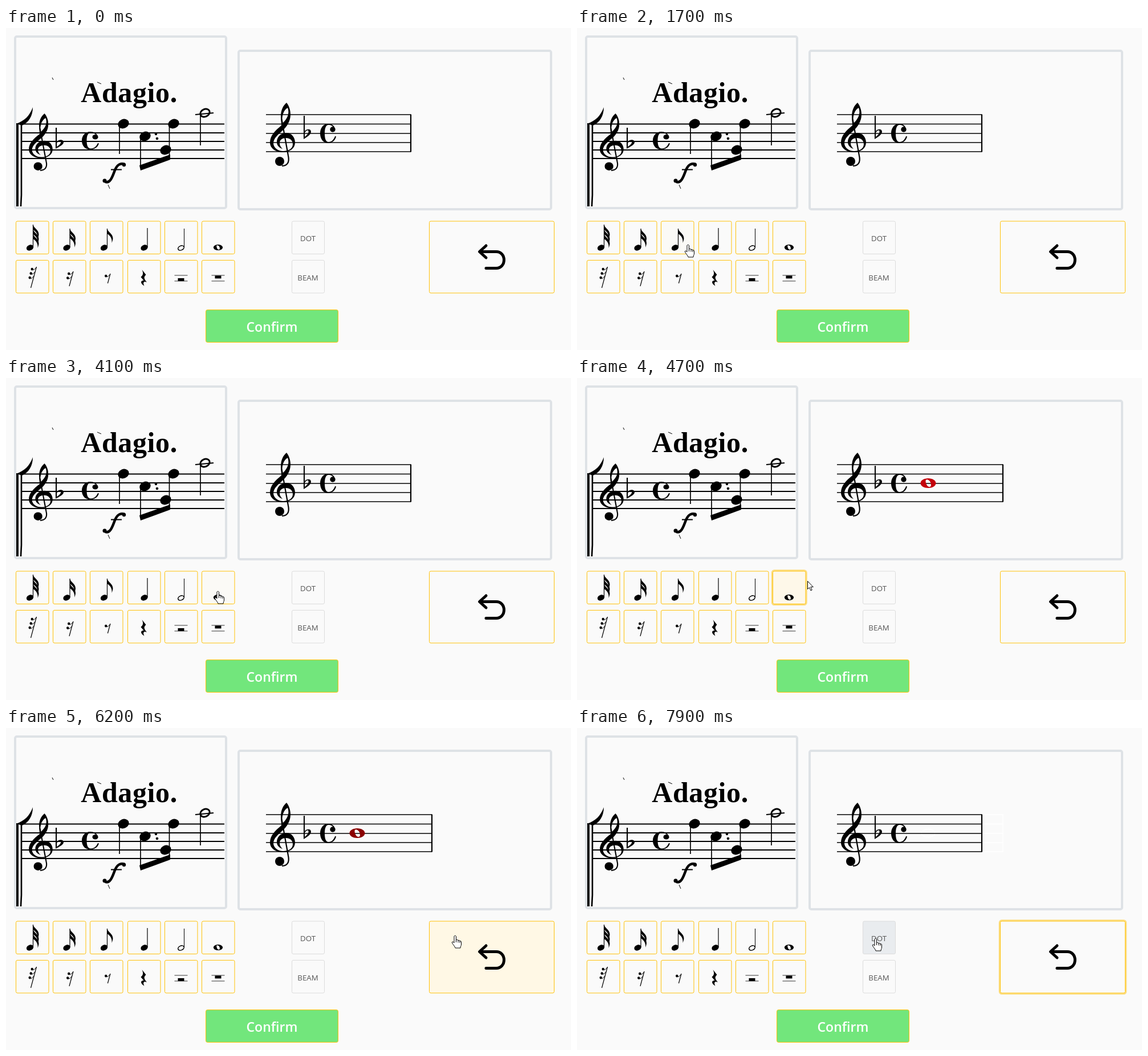
These frames come from a looping animation (991x565 px, 8 s). An HTML page:

```html
<!DOCTYPE html>
<html>
<head>
<meta charset="utf-8">
<style>
html, body { margin: 0; width: 100%; height: 100%; overflow: hidden; background: #fafafa; }
svg { display: block; }
text { font-family: "Open Sans", "Noto Sans", sans-serif; text-anchor: middle; }
.line { fill: none; stroke: #000; }
.panel { fill: none; stroke: #dee2e6; stroke-width: 4; }
</style>
</head>
<body>
<svg id="stage" width="991" height="565" viewBox="0 0 991 565">
<defs>
  <g id="clef">
    <path fill-rule="evenodd" d="M483 171C472 180 463 189 463 201C463 211 473 218 485 218C498 218 507 211 507 201C507 192 501 184 492 184C481 184 475 192 475 200C475 206 479 210 485 212C481 208 480 205 480 202C480 196 485 193 491 193C499 193 503 198 503 204C503 212 495 216 486 216C477 216 469 210 469 202C469 194 477 187 485 180C493 173 499 163 499 152C499 145 497 137 492 131C485 137 482 146 482 155C482 161 483 166 483 171ZM485 167C483 154 487 144 494 140C498 150 493 160 485 167Z"/>
    <path class="line" stroke-width="2.2" d="M483.500 160L495 224C498 237 492 242 484 242"/>
    <circle cx="480" cy="234" r="8"/>
  </g>
  <path id="flat" fill-rule="evenodd" d="M522 154H524V181C528 176 535 177 535 182C535 187 528 191 522 195ZM524 184V191C529 187 531 184 530.500 181C530 178 526 180 524 184Z"/>
  <g id="common">
    <path d="M577 177C576 171 571 168 565 168C556 168 551 176 551 185C551 194 556 202 565 202C573 202 578 196 579 190L577 190C575 196 571 200 566 200C560 200 559 192 559 185C559 178 560 170 566 170C570 170 573 172 575 175Z"/>
    <circle cx="573" cy="178" r="4.700"/>
  </g>
  <path id="whole" fill-rule="evenodd" d="M-13.500 0C-13.500-5-7-8.500 0-8.500S13.500-5 13.500 0S7 8.500 0 8.500S-13.500 5-13.500 0ZM-4.500-3C-4 2-1 7 2.500 6.500C6 6 5 2 4 -1.500C2.500-6-5-9-4.500-3Z"/>
</defs>

<rect class="panel" x="16" y="15" width="370" height="301" rx="3"/>
<rect class="panel" x="408" y="40" width="548" height="278" rx="3"/>

<g id="scan">
  <text x="216" y="130" font-size="50" font-weight="700" letter-spacing=".6" style="font-family:'Liberation Serif',serif">Adagio.</text>
  <path class="line" stroke-width="1.900" d="M24 168.500H383M28 184H383M28 199H383M28 214H383M28 229H383"/>
  <path class="line" stroke-width="4" d="M20 167V313"/>
  <path class="line" stroke-width="2.600" d="M27 168V293L26 313"/>
  <path d="M18 168C32 163 41 155 47 139C47 154 40 166 28 171Z"/>
  <use href="#clef" transform="translate(40 150) scale(.95 .9) translate(-463 -131)"/>
  <use href="#flat" transform="translate(87 175) scale(1.080 .9) translate(-522 -154)"/>
  <use href="#common" transform="translate(133 182) scale(1.070 .92) translate(-551 -168)"/>
  <path class="line" stroke-width="1.700" d="M199 168V221M236 190V246M286.500 168V230M341 150V206"/>
  <path d="M234 241L288 222V231L236 250Z"/>
  <circle cx="263" cy="186" r="2.300"/><circle cx="265" cy="194" r="2.300"/>
  <ellipse class="line" stroke-width="3" cx="349" cy="149" rx="8.500" ry="6.500" transform="rotate(-25 349 149)"/>
  <path class="line" stroke-width="2" d="M332 152L364 149"/>
  <path class="line" stroke-width="4.500" d="M174 270C182 273 186 263 190 252C194 241 199 236 208 239"/>
  <path class="line" stroke-width="2" d="M184 248.500H203"/>
  <circle cx="173" cy="268" r="3.500"/><circle cx="207" cy="240" r="3.200"/>
  <path class="line" d="M81 87L83 91M160 95L167 98M179 275L182 282"/>
</g>

<g id="ghost" class="line" style="stroke:#fff" stroke-width="1.500">
  <path d="M712 152H748M712 168.500H748M712 185H748M712 201H748M712 217H748M747 152V217"/>
  <ellipse cx="616" cy="184.500" rx="12" ry="7"/>
</g>
<path id="staff" class="line" stroke-width="1.500"/>
<path id="bar" class="line" stroke-width="2.200"/>
<use href="#clef"/><use href="#flat"/><use href="#common"/>
<use id="note" href="#whole" x="616" y="184.500"/>

<g id="buttons"></g>
<g id="icons"></g>
<path class="line" stroke-width="5" stroke-linecap="round" stroke-linejoin="round" d="M842 421.500H860C868 421.500 873.500 415 873.500 407S868 392.500 860 392.500H831M842 382L830.500 392.500L842 403"/>
<g fill="#555" font-size="13.300">
  <text x="529.500" y="374">DOT</text><text x="529.500" y="443">BEAM</text>
</g>
<rect x="350.500" y="494.500" width="232" height="57" rx="3" fill="#72e67c" stroke="#ffc107"/>
<text x="466.500" y="533" font-size="23" font-weight="600" fill="#fff">Confirm</text>

<g id="cursor" fill="#fff" stroke="#000" stroke-linejoin="round">
  <path id="arrow" d="M.5 .5V14.500L3.600 11.600L6 17L8.200 16L5.900 10.700H10.300Z"/>
  <path id="hand" d="M-2 2C-2-.2 1.500-.2 1.500 2V8C3 7 5 7.500 5 9C6.500 8 8 8.700 8 10C9.500 9.300 10.500 10 10.500 12V16C10.500 18 9 19 9 22H0C0 20-4 16-5.500 13C-6.500 11-4 10-2 13ZM1.500 8V12M5 9V12.500M8 10V13"/>
</g>
</svg>

<script>
const $ = id => document.getElementById(id);
const head = (x, y, rx = 6.4, ry = 4.8) =>
  `<ellipse cx="${x}" cy="${y}" rx="${rx}" ry="${ry}" transform="rotate(-25 ${x} ${y})"/>`;
const stroke = (d, w = 1.2) => `<path class="line" stroke-width="${w}" d="${d}"/>`;
const dot = (x, y) => `<circle cx="${x}" cy="${y}" r="2.200"/>`;

for (const [x, y] of [[206, 168], [244, 190], [280, 214], [294, 168]])
  $('scan').innerHTML += head(x, y, 10, 8);

// Stemmed notes: flags hang from the stem top, 8 px apart.
function note(x, top, flags) {
  let s = head(x - 5.5, 385.5) + stroke(`M${x} 385V${top}`);
  for (let i = 0; i < flags; i++)
    s += `<path d="M${x} ${top + i * 8}c1 6 10 9 10 17c0 3-1 5-2 8c1-8-3-13-8-16z"/>`;
  return s;
}

function rest(x, top, bottom, n) {
  const slope = 10 / 37, len = bottom - top;
  let s = stroke(`M${x} ${top}L${x - len * slope} ${bottom}`);
  for (let i = 0; i < n; i++) {
    const y = top + 1 + i * 7.5, sx = x - (y - top) * slope;
    s += dot(sx - 7.5, y + 3) + stroke(`M${sx - 8} ${y + 5}Q${sx - 3} ${y + 5} ${sx} ${y}`, 1);
  }
  return s;
}

const block = (x, y) =>
  stroke(`M${x - 11.5} 434H${x + 11.5}M${x - 11.5} 444H${x + 11.5}`, .8) +
  `<rect x="${x - 5.5}" y="${y}" width="11" height="5"/>`;

$('icons').innerHTML =
  note(47.5, 345, 3) + note(112, 352, 2) + note(177.5, 352, 1) + note(248, 351, 0) +
  `<ellipse class="line" stroke-width="1.600" cx="307" cy="386" rx="5.500" ry="3.700" transform="rotate(-25 307 386)"/>` +
  stroke('M312.500 384V352', 1) +
  '<use href="#whole" transform="translate(372 385) scale(.6)"/>' +
  rest(53.5, 419, 456, 3) + rest(118, 427, 453, 2) + rest(183, 431, 448, 1) +
  '<path d="M238.500 424L245.500 433C241 437 242 440 247 446C242 444 239.500 446 242.500 452.500C236 449 235 443 241.500 443L236.500 437C241 433 241 430 238.500 424Z"/>' +
  block(307, 439) + block(372, 434.5);

const buttons = [];
function addButton(x, y, w, h, border, tint) {
  const rect = attrs => {
    const r = document.createElementNS('http://www.w3.org/2000/svg', 'rect');
    for (const [k, v] of Object.entries({ fill: 'none', rx: 2.5, ...attrs })) r.setAttribute(k, v);
    return $('buttons').appendChild(r);
  };
  const ring = rect({ x: x - 1.5, y: y - 1.5, width: w + 3, height: h + 3, rx: 4,
    stroke: '#ffc107', 'stroke-opacity': .5, 'stroke-width': 2.5 });
  const fill = rect({ x, y, width: w, height: h, fill: tint });
  rect({ x, y, width: w, height: h, stroke: border });
  buttons.push({ x, y, w, h, ring, fill });
}
for (let row = 0; row < 2; row++)
  for (let col = 0; col < 6; col++)
    addButton(Math.round(17 + col * 65.2) + .5, row ? 407.5 : 339, 57.5, 57.5, '#ffc107', '#fff8e5');
addButton(501.5, 339, 57, 57.5, '#dcdcdc', '#e9ecef');
addButton(501.5, 407.5, 57, 57.5, '#dcdcdc', '#e9ecef');
addButton(742.5, 339, 219, 126, '#ffc107', '#fff8e5');
const WHOLE = 5, UNDO = 14;

// Pointer tip: time, x, y
const path = [
  [300, 915, 110], [400, 836, 161], [500, 836, 161], [700, 740, 195], [900, 430, 290],
  [1100, 150, 350], [1300, 56, 362], [1400, 101, 363], [1600, 141, 372], [1700, 195, 380],
  [2000, 360, 392], [2100, 377, 405], [2300, 245, 430], [2500, 105, 447], [2600, 52, 450],
  [2700, 24, 441], [2900, 80, 437], [3200, 217, 442], [3500, 340, 440], [3600, 386, 432],
  [3800, 384, 418], [4000, 374, 400], [4100, 372, 374], [4600, 372, 374], [5000, 500, 300],
  [5200, 528, 284], [5500, 513, 281], [5700, 560, 300], [6000, 730, 350], [6100, 788, 364],
  [6400, 788, 364], [6700, 560, 385], [7000, 222, 388], [7200, 110, 378], [7300, 112, 376],
  [7500, 230, 380], [7800, 514, 372], [7900, 524, 369]
];

function pointer(t) {
  if (t < path[0][0]) return null;
  const i = path.findIndex(p => p[0] > t);
  if (i < 0) return path.at(-1).slice(1);
  const [t0, x0, y0] = path[i - 1], [t1, x1, y1] = path[i], k = (t - t0) / (t1 - t0);
  return [x0 + (x1 - x0) * k, y0 + (y1 - y0) * k];
}

const inside = (b, p) => p && p[0] >= b.x && p[0] <= b.x + b.w && p[1] >= b.y && p[1] <= b.y + b.h;
const show = (el, on) => el.style.display = on ? '' : 'none';

function draw(t) {
  const now = pointer(t), before = pointer(t - 100);
  const placed = t >= 4400 && t < 6300;
  const end = placed ? 747 : 710;
  $('staff').setAttribute('d', [152, 168.5, 185, 201, 217].map(y => `M456 ${y}H${end}`).join(''));
  $('bar').setAttribute('d', `M${end} 151.500V217.500`);
  show($('note'), placed);
  $('note').setAttribute('fill', t < 5700 ? '#c4000a' : '#8b0000');
  show($('ghost'), t >= 6300);

  let over = false;
  buttons.forEach((b, i) => {
    const hit = inside(b, now);
    over ||= hit;
    b.fill.style.opacity = (hit ? .2 : 0) + (inside(b, before) ? .8 : 0);
    show(b.ring, i === WHOLE && t >= 4400 && t < 6200 || i === UNDO && t >= 6300);
  });
  show($('cursor'), now);
  show($('hand'), over);
  show($('arrow'), !over);
  if (now) $('cursor').setAttribute('transform', `translate(${now.map(Math.round)})`);
}

const start = performance.now();
function frame() {
  const t = (performance.now() - start) % 8000;
  draw(Math.floor(t / 100) * 100);
  requestAnimationFrame(frame);
}
frame();
</script>
</body>
</html>
```
